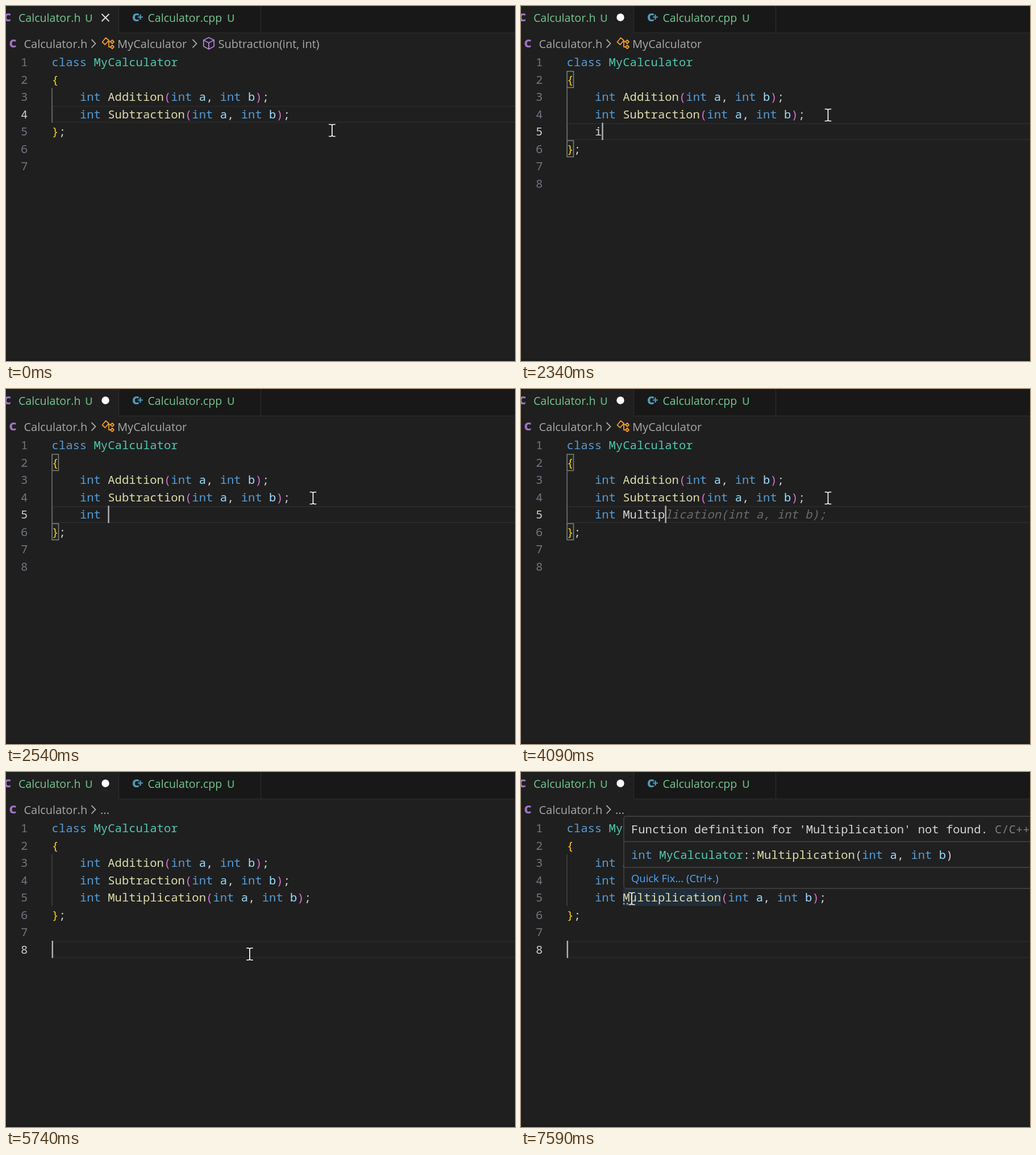
Animation of 896 by 625 pixels, one loop 8 s. Source, as an HTML page:

```html
<!DOCTYPE html>
<html lang="en">
<head>
<meta charset="utf-8">
<title>Code editor</title>
<style>
  html, body { margin: 0; width: 100%; height: 100%; overflow: hidden; background: #1f1f1f; }
  svg { display: block; }
  text { white-space: pre; fill: #ccc; font: 19.6px "Open Sans", "Noto Sans", sans-serif; }
  .code { font: 500 20.57px "Noto Sans Mono", "DejaVu Sans Mono", monospace; fill: #d4d4d4; }
  .tip { font-size: 20.52px; }
  .tab { fill: #73c991; }
  .mod { fill: #5fa578; font-weight: 600; font-size: 18.5px; }
  .file { font-weight: 800; font-size: 20px; }
  .crumb { fill: #a9a9a9; font-size: 20px; }
  .num { fill: #6e7681; }
  .num.on { fill: #ccc; }
  .kw { fill: #569cd6; }
  .type { fill: #4ec9b0; }
  .fn { fill: #dcdcaa; }
  .arg { fill: #9cdcfe; }
  .brace { fill: #ffcc14; }
  .paren { fill: #da70d6; }
  .ghost { fill: #6b6b6b; font-style: italic; }
  .dim { fill: #808080; }
  .link { fill: #4daafc; font-size: 18.45px; }
  .line { fill: none; stroke-width: 1.8; stroke-linejoin: round; }
</style>
</head>
<body>
<svg width="896" height="625" viewBox="0 0 896 625">
  <rect width="896" height="625" fill="#1f1f1f"/>
  <rect x="198" width="698" height="48" fill="#181818"/>
  <path d="M198.5 0V47.5H896M448.5 0V47" fill="none" stroke="#2b2b2b" stroke-width="1.4"/>
  <rect y="622" width="896" height="3" fill="#1b1b1b"/>
  <text class="file" x="-4" y="27" style="fill:#a074c4">C</text>
  <text class="tab" x="22" y="28">Calculator.h</text>
  <text class="mod" x="139" y="28">U</text>
  <text class="file" x="222" y="27" style="fill:#519aba">C</text>
  <path d="M232 19.5h9M236.5 15v9" stroke="#519aba" stroke-width="2.2"/>
  <text class="tab" x="249.5" y="28">Calculator.cpp</text>
  <text class="mod" x="389" y="28">U</text>
  <text class="file" x="5.5" y="73" style="fill:#a074c4">C</text>
  <text class="crumb" x="31.5" y="74">Calculator.h</text>
  <path class="line" d="M150.5 59l7 7.2l-7 7.2" stroke="#a9a9a9"/>
  <g id="view"></g>
  <g id="mouse" fill="none" stroke-linecap="square">
    <path d="M-5 -10.5H-2L0 -9.5L2 -10.5H5M0 -9V9M-5 10.5H-2L0 9.5L2 10.5H5" stroke="#1a1a1a" stroke-width="3.2"/>
    <path d="M-5 -10.5H-2L0 -9.5L2 -10.5H5M0 -9V9M-5 10.5H-2L0 9.5L2 10.5H5" stroke="#fff" stroke-width="1.7"/>
  </g>
</svg>
<script>
const LOOP = 8000, LEFT = 80.5, TOP = 83.5, CHAR = 12.35, ROW = 30.5, TICK = 1000 / 15;
const ENTER = 1670, ACCEPT = 4480, COLORED = 4620, CLICK = 5540;
const CALL = 'Multiplication(int a, int b);';
const view = document.getElementById('view');
const mouse = document.getElementById('mouse');

// [time, typed text, show completion]
const typing = [
  [ENTER, ''], [2340, 'i'], [2400, 'in'], [2470, 'int'], [2540, 'int '],
  [3070, 'int M'], [3340, 'int Mu'], [3470, 'int Mul'], [3670, 'int Mult'],
  [3740, 'int Multi'], [3810, 'int Multi', true], [4020, 'int Multip', true],
  [4150, 'int Multipl', true], [ACCEPT, 'int ' + CALL]
];
// Times at which the state flips, starting from off
const caretFlips = [810, 1280, ENTER, 2140, 2340, 5110, CLICK, 6040, 6540, 7040, 7520];
const boxFlips = [810, 4020, 4090, ACCEPT, 4550, CLICK];
// [start, steps, x, y]
const moves = [[70, 5, 540.5, 192], [5040, 7, 429, 320.5], [5940, 13, 221, 225], [6790, 4, 195, 223]];

const last = (list, t) => list.filter(e => e[0] <= t).pop();
const isOn = (flips, t) => flips.filter(f => f <= t).length % 2 === 1;
const colX = col => LEFT + col * CHAR;
const rowY = row => TOP + row * ROW;
const baseline = row => rowY(row) + 22.7;
const text = (cls, x, y, s) => `<text class="${cls}" x="${x}" y="${y}">${s}</text>`;
const span = (cls, s) => `<tspan class="${cls}">${s}</tspan>`;
const code = (row, col, s) => text('code', colX(col), baseline(row), s);

const rules = [
  [/^(int|class)$/, 'kw'], [/^MyCalculator$/, 'type'],
  [/^(Addition|Subtraction|Multiplication)$/, 'fn'], [/^[ab]$/, 'arg'],
  [/^[{}]$/, 'brace'], [/^[()]$/, 'paren']
];
function paint(src, skip) {
  return src.replace(/\w+|[{}()]/g, word => {
    const rule = rules.find(([re, cls]) => cls !== skip && re.test(word));
    return rule ? span(rule[1], word) : word;
  });
}

function crumbs(t) {
  if (t >= 5740) return text('crumb', 166, 74, '...');
  const symbol = t < 2010 ? 'Subtraction' : t >= 4900 ? 'Multiplication' : '';
  let out = `<path class="line" stroke="#ee9d28" d="M169.5 63.5L175.5 56l5.5 4.5L174.5 68zM179 62.5h5M181 62.5v9.5h3
    M184 63l3-3l3 3l-3 3zM184 72l3-3l3 3l-3 3z"/>` + text('crumb', 196, 74, 'MyCalculator');
  if (symbol) {
    out += `<path class="line" stroke="#a9a9a9" d="M328.5 59l7 7.2l-7 7.2"/>
      <path class="line" stroke="#b180d7" d="M357 55.5l9.2 4.5v11l-9.2 5l-9.2-5v-11zM347.8 60l9.2 5l9.2-5M357 65v11"/>`
      + text('crumb', 373.5, 74, symbol + '(int, int)');
  }
  return out;
}

function hover(opacity) {
  return `<g opacity="${opacity}">
    <rect x="181" y="78" width="730" height="127" rx="4" fill="#202020" stroke="#454545" stroke-width="1.5"/>
    <path d="M181 122.5H896M181 168H896" stroke="#454545" stroke-width="1.4"/>`
    + text('code tip', 194, 107.5, "Function definition for 'Multiplication' not found. " + span('dim', 'C/C++('))
    + text('code tip', 194, 152.5, paint('int MyCalculator::Multiplication(int a, int b)', 'paren'))
    + text('link', 194, 193.7, 'Quick Fix... (Ctrl+.)') + '</g>';
}

function scene(t) {
  const entered = t >= ENTER;
  const active = t < ENTER ? 3 : t < CLICK ? 4 : 7;
  const end = entered ? 5 : 4;
  const [, typed = '', ghost] = last(typing, t) || [];
  const col = active === 3 ? 34 : active === 7 ? 0 : 4 + typed.length;
  let out = entered
    ? '<circle cx="175" cy="20" r="6.7" fill="#fff"/>'
    : '<path d="M168.5 14l13 13M181.5 14l-13 13" stroke="#e4e4e4" stroke-width="1.8"/>';
  out += crumbs(t);
  out += `<rect x="82" y="${rowY(active) + 1.5}" width="830" height="${ROW - 2.5}" fill="none" stroke="#292929" stroke-width="2"/>`;
  out += `<path d="M81 ${rowY(2)}V${rowY(end)}" stroke="${t < CLICK ? '#707070' : '#404040'}" stroke-width="1.6"/>`;

  for (let i = 0; i < end + 3; i++) {
    out += text('code num' + (i === active ? ' on' : ''), 26, baseline(i), i + 1);
  }
  if (isOn(boxFlips, t)) {
    for (const row of [1, end]) {
      out += `<rect x="81" y="${rowY(row) + 1}" width="11.5" height="28.6" fill="#1d261d" stroke="#888" stroke-width="1.4"/>`;
    }
  }
  if (t >= 7520) {
    out += `<rect x="${colX(8)}" y="${rowY(4)}" width="${14 * CHAR}" height="${ROW}" fill="#264f78" opacity=".3"/>`;
  }
  out += code(0, 0, paint('class MyCalculator')) + code(1, 0, paint('{'))
    + code(2, 4, paint('int Addition(int a, int b);'))
    + code(3, 4, paint('int Subtraction(int a, int b);'))
    + code(end, 0, paint('}') + ';');
  if (entered) {
    const rest = ghost ? span('ghost', CALL.slice(typed.length - 4)) : '';
    out += code(4, 4, paint(typed, t < COLORED ? 'fn' : '') + rest);
  }
  if (t >= 6300) {
    out += '<path d="M180 232h2.4M186 232h2.4M192 232h2.4" stroke="#b5b5b5" stroke-width="2.4"/>';
  }
  if (isOn(caretFlips, t)) {
    out += `<rect x="${colX(col)}" y="${rowY(active)}" width="2.5" height="${ROW}" fill="#aeafad"/>`;
  }
  if (t >= 7520) out += hover(t < 7590 ? .6 : 1);
  return out;
}

function mouseAt(t) {
  let x = 574, y = 219;
  for (const [start, steps, toX, toY] of moves) {
    if (t < start) break;
    const p = Math.min(1, (Math.floor((t - start) / TICK) + 1) / steps);
    const k = p * p * (3 - 2 * p);
    x += (toX - x) * k;
    y += (toY - y) * k;
  }
  return [x, y];
}

let shown = '';
const began = performance.now();
function draw() {
  const t = (performance.now() - began) % LOOP;
  const next = scene(t);
  if (next !== shown) view.innerHTML = shown = next;
  mouse.setAttribute('transform', `translate(${mouseAt(t)})`);
  requestAnimationFrame(draw);
}
draw();
</script>
</body>
</html>
```
